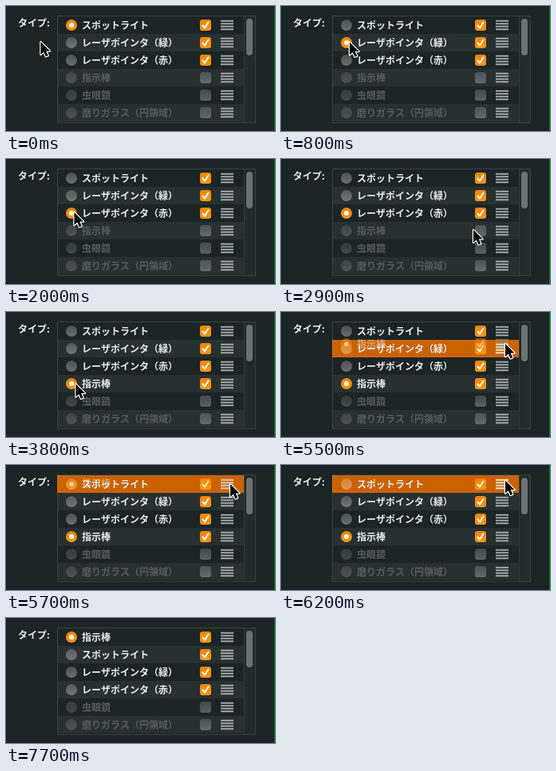
Recreate the animation shown at these times as an HTML page with a canvas. Size 337 by 157 pixels, loop 8000 ms.

```html
<!DOCTYPE html>
<html lang="ja">
<head>
<meta charset="utf-8">
<style>
  html, body { margin: 0; width: 100%; height: 100%; overflow: hidden; background: #1b2526; }
  canvas { display: block; }
</style>
</head>
<body>
<canvas id="stage" width="337" height="157"></canvas>
<script>
const ctx = document.getElementById('stage').getContext('2d');
const LOOP = 8000, STEP = 100, ROW = 22, TOP = 13;
const LABELS = ['スポットライト', 'レーザポインタ（緑）', 'レーザポインタ（赤）', '指示棒', '虫眼鏡', '磨りガラス（円領域）'];
const POINTER = 3;
const START = { x: 43.5, y: 45 };

// Cursor moves: start, end, target x, target y, sideways bend
const MOVES = [
  [200, 500, 86, 45.5, 0],
  [1100, 1400, 85.5, 67, 0],
  [2200, 3000, 248, 90, 0],
  [3100, 3500, 87.5, 90.5, 2],
  [4100, 5000, 281, 90, 13],
];
const DRAG = { start: 5200, end: 5900, drop: 6100, settle: 6300, fromY: 90, toY: 19.5 };

const smooth = p => p * p * (3 - 2 * p);
const clamp = p => Math.max(0, Math.min(1, p));
const rowCenter = i => TOP + ROW * (i + 0.5);

function cursorAt(t) {
  let { x, y } = START;
  for (const [start, end, tx, ty, bend] of MOVES) {
    if (t <= start) break;
    const p = smooth(clamp((t - start) / (end - start)));
    x += (tx - x) * p;
    y += (ty - y) * p + bend * Math.sin(Math.PI * p);
  }
  if (t > DRAG.start) {
    const p = clamp((t - DRAG.start) / (DRAG.end - DRAG.start));
    y = DRAG.fromY + (DRAG.toY - DRAG.fromY) * (1 - (1 - p) ** 2.2);
  }
  return { x, y };
}

function selectedAt(t) {
  return t < 800 ? 0 : t < 1700 ? 1 : t < 3700 ? 2 : POINTER;
}

function box(x, y, w, h, r, fill) {
  ctx.fillStyle = fill;
  ctx.beginPath();
  ctx.roundRect(x, y, w, h, r);
  ctx.fill();
}

function shade(y, top, bottom) {
  const g = ctx.createLinearGradient(0, y - 7, 0, y + 7);
  g.addColorStop(0, top);
  g.addColorStop(1, bottom);
  return g;
}

function text(label, x, y, color) {
  ctx.fillStyle = color;
  ctx.fillText(label, x, y);
}

function drawRow(item, y, { enabled, selected, hot }) {
  const orange = shade(y, '#f58400', '#ff9614');
  const grey = alpha => shade(y, `rgba(255,255,255,${alpha * 0.6})`, `rgba(255,255,255,${alpha})`);
  box(75, y - 7, 14, 14, 7, selected ? orange : grey(enabled ? 0.34 : 0.17));
  if (selected) box(79, y - 3, 6, 6, 3, '#fff');

  text(LABELS[item], 95, y + 4.5, enabled ? '#e9ebeb' : '#555d5e');

  box(243, y - 7, 14, 14, 3, enabled ? orange : grey(0.28));
  if (enabled) {
    ctx.strokeStyle = '#fff';
    ctx.lineWidth = 2;
    ctx.lineCap = ctx.lineJoin = 'round';
    ctx.beginPath();
    ctx.moveTo(246.5, y + 0.5);
    ctx.lineTo(249, y + 3.5);
    ctx.lineTo(253.5, y - 3.5);
    ctx.stroke();
  }
  for (let k = 0; k < 4; k++) box(269, y - 6.25 + 3.5 * k, 16, 2, 0, hot ? '#f3ddca' : '#a2a7a7');
}

function drawCursor({ x, y }) {
  const outline = [[0, 0], [0, 16], [3.8, 12.5], [6.4, 18.5], [9.2, 17.3], [6.7, 11.5], [11.5, 11.5]];
  ctx.beginPath();
  outline.forEach(([dx, dy]) => ctx.lineTo(x + dx, y + dy));
  ctx.closePath();
  ctx.lineJoin = 'round';
  ctx.lineWidth = 2.4;
  ctx.strokeStyle = '#fff';
  ctx.stroke();
  ctx.fillStyle = '#000';
  ctx.fill();
}

function draw(t) {
  const cursor = cursorAt(t);
  const dragging = t > DRAG.start && t < DRAG.settle;
  const target = dragging ? Math.floor((cursor.y - TOP) / ROW) : -1;
  const order = t < DRAG.settle ? [0, 1, 2, 3, 4, 5] : [3, 0, 1, 2, 4, 5];

  ctx.fillStyle = '#1b2526';
  ctx.fillRect(0, 0, 337, 157);
  box(336, 0, 1, 157, 0, '#008000');
  ctx.font = 'bold 12px "Noto Sans CJK JP", "Noto Sans CJK", sans-serif';
  text('タイプ:', 15, 25.5, '#e9ebeb');

  box(64, 12, 249, 135, 0, '#394243');
  box(65, 13, 247, 133, 0, '#1b2526');
  box(299, 13, 13, 133, 0, '#222b2c');
  box(301, 16, 8, 46, 4, '#6c7172');

  order.forEach((item, i) => {
    const hot = i === target && i < POINTER;
    if (i % 2) box(65, TOP + ROW * i, 234, ROW, 0, '#273132');
    if (hot) box(64, TOP + ROW * i, 235, ROW, 0, '#cb6200');
    const enabled = item < POINTER || (item === POINTER && t >= 3100);
    drawRow(item, rowCenter(i), { enabled, selected: item === selectedAt(t), hot });
  });
  box(298, 13, 1, 133, 0, '#323b3c');

  if (dragging && t < DRAG.drop) {
    ctx.globalAlpha = 0.5;
    drawRow(POINTER, cursor.y, { enabled: true, selected: true });
    ctx.globalAlpha = 1;
  }
  if (t < 7700) drawCursor(cursor);
}

function tick() {
  const t = performance.now() % LOOP;
  draw(Math.floor(t / STEP) * STEP);
  requestAnimationFrame(tick);
}
tick();
</script>
</body>
</html>
```
